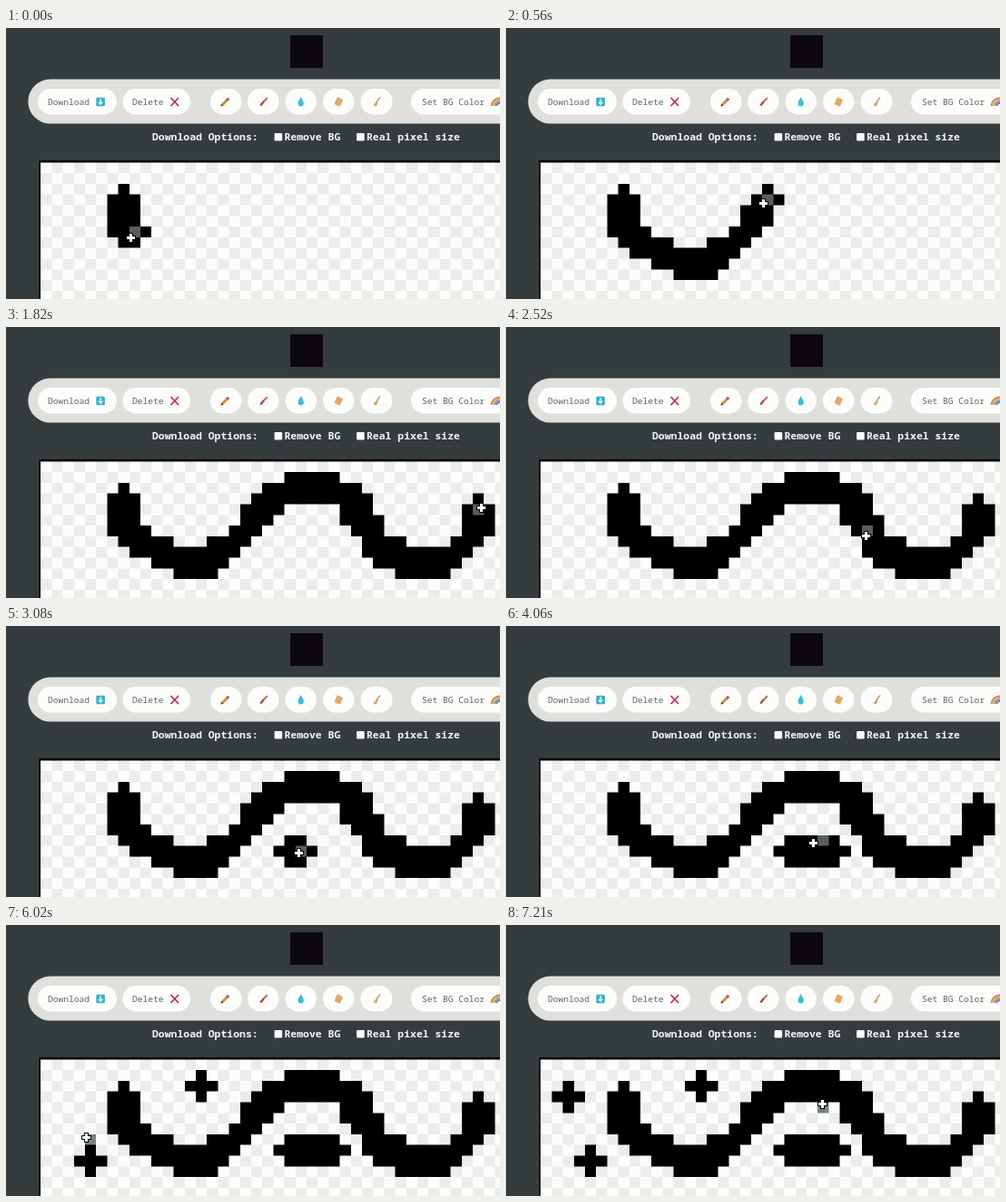
These frames come from a looping animation (544 px wide and 299 px high, 7280 ms). An HTML page with a canvas:

```html
<!DOCTYPE html>
<html lang="en">
<head>
<meta charset="utf-8">
<title>Pixel editor</title>
<style>
  html, body { margin: 0; width: 100%; height: 100%; overflow: hidden; background: #343c3d; }
  svg, canvas { position: absolute; left: 0; top: 0; width: 544px; height: 299px; display: block; }
  text { font-family: "Noto Sans Mono", "DejaVu Sans Mono", monospace; white-space: pre; }
  .btn { font-size: 9.6px; fill: #606464; }
  .opt { font-size: 11.45px; font-weight: 600; fill: #f5f6f6; }
  .pill { fill: #fcfdfb; }
</style>
</head>
<body>
<canvas id="board" width="1088" height="598"></canvas>
<svg viewBox="0 0 544 299">
  <rect x="313" y="8" width="36" height="36" fill="#0d080d"/>

  <rect x="24.3" y="56.6" width="620" height="48.9" rx="24.4" fill="#dfe0dc"/>
  <g class="pill">
    <rect x="35" y="67" width="87" height="28.5" rx="14.2"/>
    <rect x="128.5" y="67" width="74.5" height="28.5" rx="14.2"/>
    <rect x="225" y="67" width="34.5" height="28.5" rx="14.2"/>
    <rect x="266" y="67" width="34.5" height="28.5" rx="14.2"/>
    <rect x="307.5" y="67" width="34.5" height="28.5" rx="14.2"/>
    <rect x="349" y="67" width="34.5" height="28.5" rx="14.2"/>
    <rect x="390.5" y="67" width="35" height="28.5" rx="14.2"/>
    <rect x="446" y="67" width="120" height="28.5" rx="14.2"/>
  </g>
  <g class="btn">
    <text x="46" y="84.5">Download</text>
    <text x="139" y="84.5">Delete</text>
    <text x="458" y="84.5">Set BG Color</text>
  </g>

  <g fill="none">
    <!-- download, delete -->
    <rect x="99.3" y="76.7" width="9.6" height="9.6" rx="1.2" fill="#2fb2d0"/>
    <path d="M104.1 78.2v5.6M101.8 81.6l2.3 2.5 2.3-2.5" stroke="#fff" stroke-width="1.4"/>
    <path d="M181.5 77l8.5 9M190 77l-8.5 9" stroke="#c5274a" stroke-width="1.7"/>
    <!-- pencil, brush -->
    <path d="M238.5 84.5l5.5-5.5" stroke="#d98c2e" stroke-width="3"/>
    <path d="M243.4 79.6l1.8-1.8" stroke="#b9505a" stroke-width="3"/>
    <path d="M236.5 86.5l.7-3 2.4 2.3z" fill="#4b3a30"/>
    <path d="M287.8 77.2l-4.6 4.6" stroke="#c9603f" stroke-width="1.9"/>
    <path d="M283.8 81.2l-3.6 4.4" stroke="#a8483f" stroke-width="2.3"/>
    <!-- drop -->
    <path d="M324.7 76c1 2.6 3.2 4.4 3.2 7a3.2 3.4 0 0 1-6.4 0c0-2.6 2.2-4.4 3.2-7z" fill="#35c2dc"/>
    <!-- sponge -->
    <rect x="362.8" y="77.2" width="7" height="8.6" rx="1.4" fill="#e3a765" transform="rotate(24 366.3 81.5)"/>
    <!-- broom -->
    <path d="M412 76.5l-4 5" stroke="#8d7a6c" stroke-width="1.2"/>
    <path d="M408.6 80.2l1.3 1.4-2 4.8-3.6-1.2z" fill="#cfa873"/>
    <!-- rainbow -->
    <path d="M534.5 86a9 9 0 0 1 9.5-8.5" stroke="#dd7a55" stroke-width="1.8"/>
    <path d="M536.4 86a7.2 7.2 0 0 1 7.6-6.6" stroke="#e0b055" stroke-width="1.8"/>
    <path d="M538.3 86a5.4 5.4 0 0 1 5.7-4.8" stroke="#6aa8a4" stroke-width="1.8"/>
    <path d="M540.2 86a3.6 3.6 0 0 1 3.8-3" stroke="#8073b0" stroke-width="1.8"/>
  </g>

  <g class="opt">
    <text x="161" y="124.2">Download Options:</text>
    <text x="306.5" y="124.2">Remove BG</text>
    <text x="397" y="124.2">Real pixel size</text>
  </g>
  <rect x="295.6" y="115.9" width="8.6" height="8.6" rx="1.2" fill="#fff"/>
  <rect x="386.1" y="115.9" width="8.6" height="8.6" rx="1.2" fill="#fff"/>
</svg>
<script>
const LOOP = 7280, STEP = 140, LAST = 7210, STROKE_END = 13;
const LEFT = 38.2, TOP = 148.3, CW = 12.2, CH = 11.8, SCALE = 2;
const ctx = document.getElementById('board').getContext('2d');
ctx.scale(SCALE, SCALE);

const clamp = v => Math.min(1, Math.max(0, v));
const mix = (a, b, k) => a + (b - a) * k;
const smooth = k => k * k * (3 - 2 * k);

// Bends of the long wavy stroke, in cells
const bends = [
  [7,3],[7,6],[8,6],[8,7],[12,9],[15,9],[15,8],[16,8],[19,5],[19,4],[22,2],
  [25,2],[28,3],[28,5],[29,5],[30,7],[30,8],[32,8],[32,9],[36,9],[39,6],[39,4]
];
const nearest = v => Math.ceil(v - .5);
const stroke = bends.slice(1).reduce((cells, [c, r], i) => {
  const [c0, r0] = bends[i];
  const n = Math.max(Math.abs(c - c0), Math.abs(r - r0));
  for (let k = 1; k <= n; k++)
    cells.push([nearest(mix(c0, c, k / n)), nearest(mix(r0, r, k / n))]);
  return cells;
}, [bends[0]]);

// Where the pointer rests afterwards: position in cells, time in steps
const stops = [
  { x: 39.75, y: 4.3, arrive: STROKE_END, leave: 14 },
  { x: 22.5, y: 8.6, arrive: 21, leave: 21, paint: true },
  { x: 26.5, y: 8.6, arrive: 26, leave: 28, paint: true, drag: true },
  { x: 14.4, y: 2.95, arrive: 32, leave: 33, paint: true },
  { x: 4.9, y: 9.95, arrive: 37, leave: 41, paint: true },
  { x: 2.9, y: 3.5, arrive: 45.5, leave: 46.5, paint: true },
  { x: 25.4, y: 4.15, arrive: 51.5 }
];

function pointerAt(s) {
  const i = Math.max(1, stops.findIndex(p => s <= p.arrive));
  const a = stops[i - 1], b = stops[i];
  const t = clamp((s - a.leave) / (b.arrive - a.leave));
  const k = b.drag ? t : smooth(t);
  return [mix(a.x, b.x, k), mix(a.y, b.y, k)];
}

const snap = v => Math.round(v * SCALE) / SCALE;
const colX = c => snap(LEFT + c * CW);
const rowY = r => snap(TOP + r * CH);

function cell(c, r, color) {
  const x = colX(c), y = rowY(r);
  ctx.fillStyle = color;
  ctx.fillRect(x, y, colX(c + 1) - x, rowY(r + 1) - y);
}

function stamp([c, r]) {
  for (const d of [-1, 0, 1]) {
    cell(c + d, r, '#000');
    cell(c, r + d, '#000');
  }
}

function cross(x, y, arm, half, color) {
  ctx.fillStyle = color;
  ctx.fillRect(x - arm, y - half, arm * 2, half * 2);
  ctx.fillRect(x - half, y - arm, half * 2, arm * 2);
}

function drawBoard() {
  ctx.fillStyle = '#000';
  ctx.fillRect(36.5, 146.3, 508, 153);
  for (let r = 0; r < 13; r++)
    for (let c = 0; c < 42; c++) cell(c, r, (c + r) % 2 ? '#ebedea' : '#fcfdfb');
}

function drawMarks(s) {
  stops.forEach((p, i) => {
    if (!p.paint) return;
    const from = p.drag ? stops[i - 1] : p;
    if (s < from.arrive) return;
    const end = p.drag ? pointerAt(Math.min(s, p.arrive))[0] : p.x;
    for (let c = Math.floor(from.x); c <= end; c++) stamp([c, Math.floor(p.y)]);
  });
}

function draw(s) {
  drawBoard();
  // The hand slows down along the stroke
  const k = Math.min(s, STROKE_END);
  const end = Math.round(4 + 4.05 * k - .069 * k * k);
  stroke.slice(0, end + 1).forEach(stamp);
  drawMarks(s);

  let pos, hover;
  if (s < STROKE_END) {
    const t = s / STROKE_END;
    hover = stroke[end];
    pos = [hover[0] + .1 + .65 * t ** 4, hover[1] + 1 - .7 * t];
  } else {
    pos = pointerAt(s);
    // The highlight trails the pointer slightly
    hover = pointerAt(s - .15).map(Math.floor);
  }
  cell(hover[0], hover[1], 'rgba(100,112,114,.85)');
  const x = Math.round(LEFT + pos[0] * CW) + .5, y = Math.round(TOP + pos[1] * CH) + .5;
  cross(x, y, 5.5, 2.5, '#000');
  cross(x, y, 4.5, 1.5, '#fff');
}

function tick(now) {
  const t = now % LOOP;
  draw(t >= LAST ? 51.5 : Math.min(50, Math.floor(t / STEP)));
  requestAnimationFrame(tick);
}
tick(performance.now());
</script>
</body>
</html>
```
